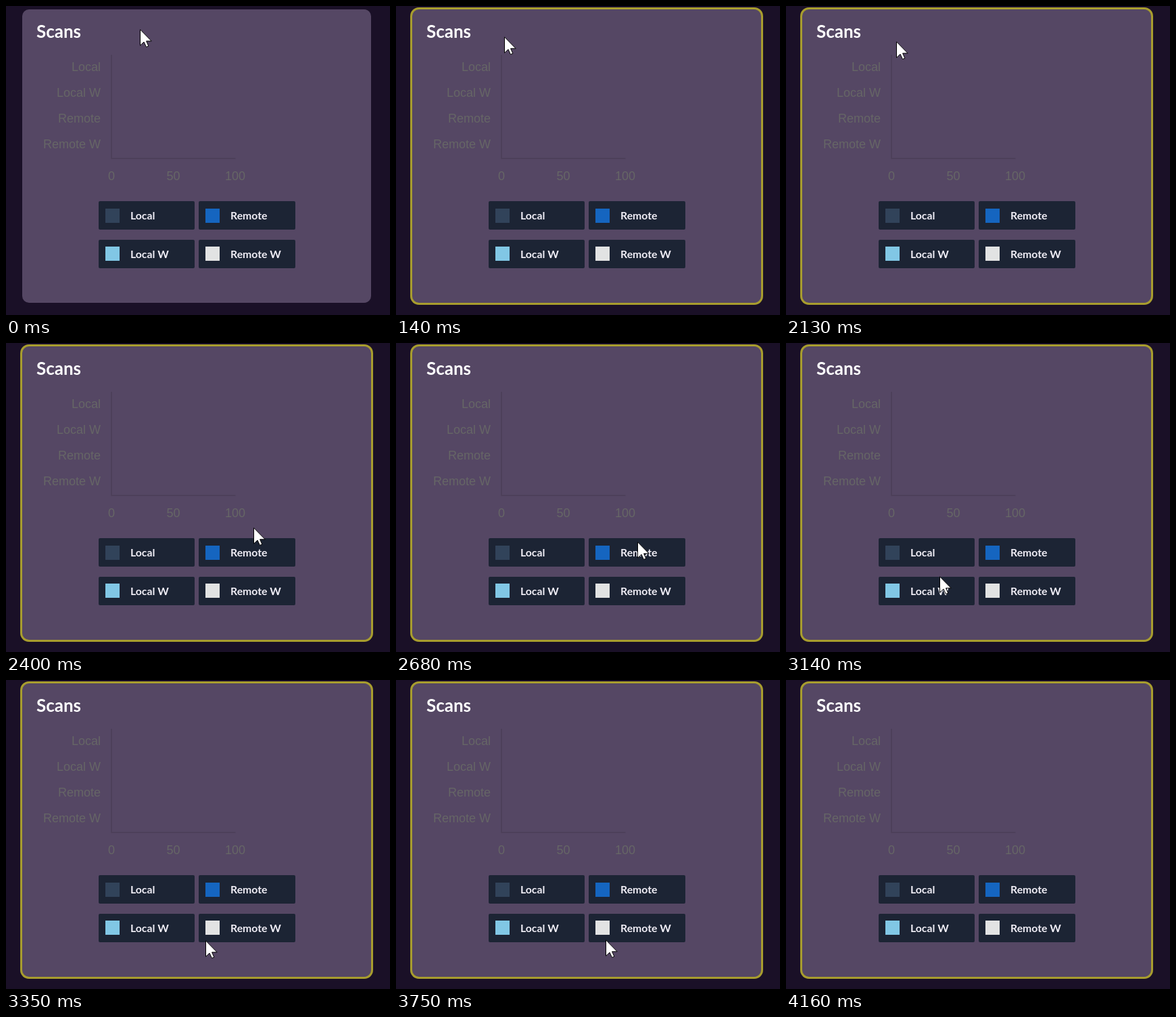
Recreate the animation shown at these times as an HTML page. Size 568x456 px, loop 4.22 s.

```html
<!DOCTYPE html>
<html lang="en">
<head>
<meta charset="utf-8">
<title>Scans</title>
<style>
  html, body { margin: 0; width: 100%; height: 100%; overflow: hidden; background: #1a1027; }
  svg { display: block; }
  .title { font: 700 26px Lato, sans-serif; fill: #fff; }
  .axis { font: 18px "Liberation Sans", Arial, sans-serif; fill: #666; }
  .key { font: 700 15.8px Lato, sans-serif; fill: #f0eef6; }
  .left { text-anchor: end; }
  .below { text-anchor: middle; }
</style>
</head>
<body>
<svg width="568" height="456" viewBox="0 0 568 456">
  <rect id="ring" x="21" y="2" width="522" height="439" rx="13" fill="#a89d2e"/>
  <rect x="24" y="5" width="516" height="433" rx="10" fill="#554764"/>
  <text class="title" x="45" y="47">Scans</text>
  <path d="M156 72V225M155 225H339.5" fill="none" stroke="#4d405a" stroke-width="2"/>
  <g id="chart"></g>
  <path id="cursor" d="M.5 .8V24.2L6 19L9.5 26.5L12.8 25.1L9.6 17.8H17.2Z"
        fill="#fff" stroke="#000"/>
</svg>
<script>
const LOOP = 4220;
const TICK = 68;
const chart = document.getElementById('chart');

function add(tag, attrs, text = '') {
  const node = document.createElementNS('http://www.w3.org/2000/svg', tag);
  for (const name in attrs) node.setAttribute(name, attrs[name]);
  node.textContent = text;
  chart.append(node);
}

['Local', 'Local W', 'Remote', 'Remote W'].forEach((label, i) =>
  add('text', { class: 'axis left', x: 140, y: 96 + 38 * i }, label));

[0, 50, 100].forEach((value, i) =>
  add('text', { class: 'axis below', x: 156 + 91.5 * i, y: 257 }, value));

const legend = [
  ['Local', '#31435a'], ['Remote', '#1565c0'],
  ['Local W', '#81c7e5'], ['Remote W', '#e2e3e3']
];
legend.forEach(([label, fill], i) => {
  const row = i >> 1;
  const x = 137 + 148 * (i % 2);
  const y = 288 + 57 * row;
  add('rect', { x, y, width: 142 + i % 2, height: 42, rx: 2, fill: '#1c2434' });
  add('rect', { x: x + 10, y: y + 11 - row, width: 21, height: 21, fill });
  add('text', { class: 'key', x: x + 47, y: y + 27 }, label);
});

// Pointer moves: start, end, and where each one arrives
const home = { x: 198, y: 34 };
const moves = [
  { from: 0, to: 140, x: 160, y: 45 },
  { from: 2060, to: 2130, x: 163, y: 52 },
  { from: 2130, to: 2400, x: 366, y: 272 },
  { from: 2400, to: 2610, x: 383, y: 287 },
  { from: 2610, to: 2880, x: 217, y: 327 },
  { from: 2880, to: 3140, x: 227, y: 344 },
  { from: 3140, to: 3350, x: 295, y: 384 },
  { from: 3350, to: 3490, x: 326, y: 385 },
  { from: 3680, to: 3820, x: 293, y: 381 },
  { from: 3950, to: 4090, x: 212, y: 406 }
];

const ease = p => p * p * (3 - 2 * p);
const mix = (a, b, p) => Math.round(a + (b - a) * p);
const pose = (time, x, y, opacity = 1) =>
  ({ time, transform: `translate(${x}px, ${y}px)`, opacity });

// The pointer is redrawn once per tick, so each glide becomes a few held poses
function glide(start, { from, to, x, y }) {
  const count = Math.round((to - from) / TICK);
  return Array.from({ length: count }, (_, i) => {
    const p = (i + 1) / count;
    return pose(mix(from, to, p), mix(start.x, x, ease(p)), mix(start.y, y, ease(p)));
  });
}

function play(id, poses) {
  const frames = poses.map(({ time, ...style }) =>
    ({ offset: time / LOOP, easing: 'step-end', ...style }));
  document.getElementById(id).animate(frames, { duration: LOOP, iterations: Infinity });
}

const last = moves[moves.length - 1];
play('cursor', [
  pose(0, home.x, home.y),
  ...moves.flatMap((move, i) => glide(moves[i - 1] || home, move)),
  pose(4160, last.x, last.y, 0),
  pose(LOOP, last.x, last.y, 0)
]);
play('ring', [
  { time: 0, opacity: 0 }, { time: 70, opacity: 1 }, { time: LOOP, opacity: 1 }
]);
</script>
</body>
</html>
```
